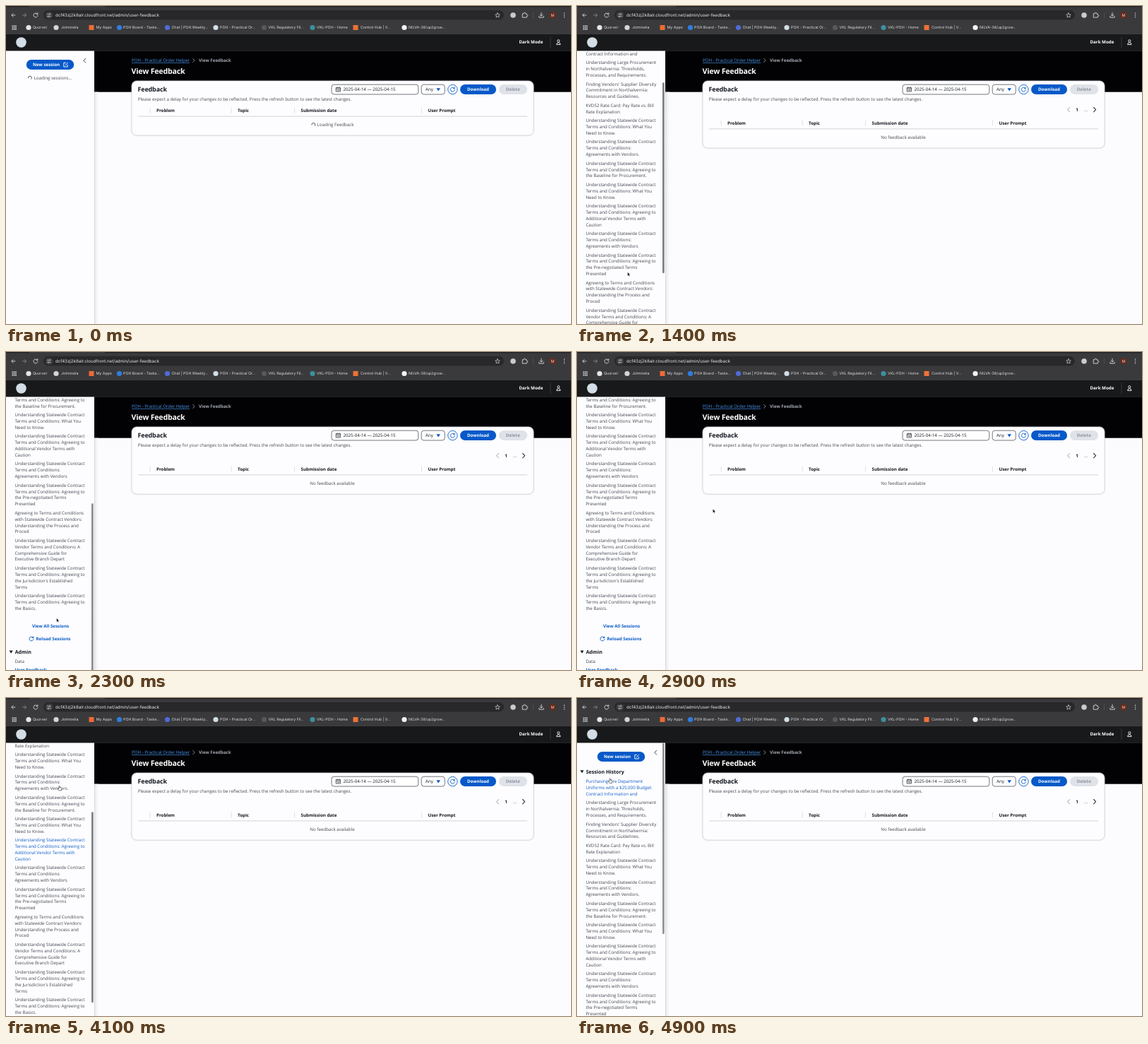
Recreate the animation shown at these times as an HTML page. Size 800x450 px, loop 5000 ms.

```html
<!DOCTYPE html>
<html lang="en">
<head>
<meta charset="utf-8">
<title>View Feedback</title>
<style>
  html, body { margin: 0; width: 100%; height: 100%; overflow: hidden; background: #fcfcff; }
  svg { display: block; width: 800px; height: 450px; }
  text { font: 6.2px "Open Sans", sans-serif; fill: #42464f; text-rendering: geometricPrecision; white-space: pre; }
  .b { font-weight: 700; }
  .dark { fill: #14181f; }
  .white { fill: #fff; }
  .blue { fill: #0b5bc4; }
  .mid { text-anchor: middle; }
  .ui { font: 5.3px Inter, sans-serif; fill: #dcdde0; }
  .url { font: 6.15px Inter, sans-serif; fill: #e8e9eb; }
  .h1 { font-size: 10.65px; letter-spacing: -.02em; }
  .h2 { font-size: 8.85px; letter-spacing: -.008em; }
  .h3 { font-size: 7.1px; }
  .line { fill: none; stroke: #42464f; stroke-width: .9; stroke-linecap: round; stroke-linejoin: round; }
  .item.hover text { fill: #0b5bc4; }
</style>
</head>
<body>
<svg viewBox="0 0 800 450">
  <defs>
    <clipPath id="sideClip"><rect y="63.5" width="125" height="387"/></clipPath>
    <linearGradient id="edge">
      <stop offset="0" stop-color="#c9ccd4"/><stop offset=".25" stop-color="#eceef3"/><stop offset="1" stop-color="#fcfcff"/>
    </linearGradient>
    <filter id="soft" x="-5%" y="-15%" width="110%" height="130%"><feGaussianBlur stdDeviation="1.3"/></filter>
    <g id="reload">
      <path class="line" style="stroke:inherit" d="M2.6 -1.5A3 3 0 1 0 3 .5M2.9 -3.2V-1.3H1"/>
    </g>
  </defs>
  <g id="browser"></g>
  <g id="page"></g>
  <g id="side" clip-path="url(#sideClip)">
    <rect y="63" width="125" height="388" fill="#fdfdff"/>
    <g id="scroll"></g>
    <rect id="thumb" x="121" width="2.7" height="270" rx="1.35" fill="#7d7f83"/>
  </g>
  <g id="cursor">
    <path id="arrow" d="M0 0V5.6L1.3 4.5L2.1 6.5L3.1 6.1L2.3 4.1H4.1Z" fill="#000" stroke="#fff" stroke-width=".55"/>
    <path id="hand" d="M-.7 .4Q0 -.6 .6 .4V2.2L2.6 2.7Q3.4 3 3.3 3.9L2.8 6.4H-.6L-2.4 3.9Q-2.4 3 -1.5 3.4L-.7 4Z" fill="#fff" stroke="#222" stroke-width=".6"/>
  </g>
</svg>
<script>
const LOOP = 5000, STEP = 100;
const $ = id => document.getElementById(id);
const text = (x, y, str, cls = '') => `<text x="${x}" y="${y + 2.2}" class="${cls}">${str}</text>`;
const rect = (x, y, w, h, fill, more = '') => `<rect x="${x}" y="${y}" width="${w}" height="${h}" fill="${fill}" ${more}/>`;
const dot = (x, y, r, fill, more = '') => `<circle cx="${x}" cy="${y}" r="${r}" fill="${fill}" ${more}/>`;
const line = (d, color = '#42464f', w = .9) => `<path class="line" d="${d}" style="stroke:${color};stroke-width:${w}"/>`;
const reload = (x, y, color) => `<use href="#reload" x="${x}" y="${y}" stroke="${color}"/>`;
const spinner = (x, y) => `<circle class="line spin" cx="${x}" cy="${y}" r="2.5" pathLength="1" data-at="${x} ${y}"/>`;

// Browser toolbar and bookmarks
const bookmarks = [
  [32, '#e4e5e7', 'Quorvel'], [71, '#d4d5d8', 'Jotmirelia', 78], [121, '#ee6a35', 'My Apps', 127.5, 1],
  [160.5, '#2e7de0', 'POH Board - Tasks...', 166], [228.5, '#4f6bd8', 'Chat | POH Weekly...', 234.5],
  [297, '#d3dde5', 'POH - Practical Or...', 303], [365.5, '#55585c', 'VKL Regulatory Fil...', 371.5],
  [434, '#3e8fa0', 'VKL-POH - Home', 440], [495, '#ee7237', 'Control Hub | V...', 502, 1],
  [564, '#f2f2f3', 'NILVA-38/up2grow...', 570]
];
const light = '#d6d7da';
let grid = '';
for (let i = 0; i < 9; i++) grid += rect(8.6 + i % 3 * 2.3, 27.5 + (i / 3 | 0) * 2.3, 1.6, 1.6, light);
$('browser').innerHTML =
  rect(0, 0, 800, 39.5, '#3a3a3c') + rect(0, 0, 33, 1.3, '#1f2022') + rect(140, 0, 660, 1.3, '#1f2022') +
  rect(53, 6, 652, 13.5, '#28282a', 'rx="6.75"') +
  line('M13 13H8M10.2 10.7L7.9 13L10.2 15.3', light) +
  line('M23.5 13H28.5M26.3 10.7L28.6 13L26.3 15.3', '#86878a') +
  reload(42, 13, light) + dot(61, 13, 5.3, '#3d3d40') +
  line('M58.7 11.5H60.4M62 14.6H63.4M58.7 14.6H59.6', light, .8) +
  dot(62.2, 11.5, .9, 'none', 'stroke="#d6d7da" stroke-width=".7"') +
  dot(60.3, 14.6, .9, 'none', 'stroke="#d6d7da" stroke-width=".7"') +
  text(70, 13, 'dcf43zj2k8alr.cloudfront.net/admin/user-feedback', 'url') +
  line('M696 9.8L697 12L699.3 12.2L697.5 13.8L698.1 16.1L696 14.8L693.9 16.1L694.5 13.8L692.7 12.2L695 12Z', light, .7) +
  dot(718, 13, 3.8, '#c9cbcd') +
  line('M731.6 10.8H733.3Q733.3 9.2 734.4 9.2T735.5 10.8H737.2V12.5Q738.8 12.5 738.8 13.6T737.2 14.7V16.2H731.6Z', light) +
  rect(746, 9, .6, 8, '#5a5b5e') +
  line('M758 9.3V14M756 12.2L758 14.2L760 12.2M754.8 14.5V16.2H761.2V14.5', light) +
  dot(774, 13, 4.7, '#6b2b1b') + text(774, 12.8, 'M', 'ui mid') +
  [10.3, 13, 15.7].map(y => dot(790.5, y, .75, light)).join('') +
  grid +
  bookmarks.map(([x, fill, name, tx = 38, square]) =>
    (square ? rect(x - 3.5, 27, 7, 7, fill) : dot(x, 30.5, 3.6, fill)) + text(tx, 30.2, name, 'ui')).join('');

// Page content
const blue = '#0759c9';
const columns = [[204, 213, 'Problem'], [319, 328, 'Topic'], [408.5, 417.5, 'Submission date'], [588.5, 597.5, 'User Prompt']];
const card = more => `<rect x="178" y="106" width="569" rx="7" class="card" ${more}/>`;
$('page').innerHTML =
  rect(0, 39.3, 800, 24.5, '#17191b') + dot(21.5, 51.5, 7.3, '#d3dde5') +
  text(726.5, 51, 'Dark Mode', 'b white') + rect(770.6, 43.5, .7, 15.5, '#45484c') +
  dot(782.3, 49.4, 1.6, 'none', 'stroke="#fff" stroke-width=".9"') +
  line('M779.6 54.2Q779.6 51.8 782.3 51.8T785 54.2Z', '#fff') +
  rect(0, 63.5, 800, 58.2, '#020204') + rect(125, 121.7, 6, 330, 'url(#edge)') +
  `<text x="178" y="79.2" style="fill:#4a9bf5;text-decoration:underline">POH - Practical Order Helper</text>` +
  line('M264.6 74.5L267.1 77L264.6 79.5', '#8b919c') +
  `<text x="273" y="79.2" class="b" style="fill:#a3a8b1">View Feedback</text>` +
  text(177.6, 93.6, 'View Feedback', 'h1 b white') +
  card('fill="#8a8f9a" opacity=".45" filter="url(#soft)"') +
  card('fill="#fdfdff" stroke="#cdd0d7" stroke-width=".7"') +
  text(186.5, 119, 'Feedback', 'h2 b dark') +
  text(186.7, 131.8, 'Please expect a delay for your changes to be reflected. Press the refresh button to see the latest changes.') +
  rect(461, 111.2, 122.8, 13.8, '#fff', 'rx="3.4" stroke="#63676f" stroke-width=".9"') +
  line('M467.6 115.6H473.4V121H467.6ZM467.6 117.2H473.4M469 114.7V115.6M472 114.7V115.6M469 119.2H472', '#30343b', .8) +
  text(477.5, 118.2, '2025-04-14 — 2025-04-15', 'dark') +
  rect(588.2, 111.2, 33, 13.8, '#fff', 'rx="3.4" stroke="#63676f" stroke-width=".9"') +
  text(594, 118.2, 'Any', 'dark') + `<path d="M609.4 116.2H615L612.2 120.4Z" fill="${blue}"/>` +
  dot(632.4, 118.1, 6.7, '#fff', `stroke="${blue}" stroke-width=".9"`) + reload(632.4, 118.1, blue) +
  rect(643, 111, 51, 14.1, blue, 'rx="7"') + text(668.5, 118.2, 'Download', 'b white mid') +
  rect(698, 111, 40, 14.1, '#dfe2e8', 'rx="7"') +
  `<text x="717.8" y="120.4" class="b mid" style="fill:#8e949f">Delete</text>` +
  `<g id="head">` + columns.map(([bar, x, name]) =>
    rect(bar - .3, 143.8, .7, 8, '#d2d4da') + text(x, 147.8, name, 'b dark')).join('') +
  rect(187, 155.7, 551, .8, '#c6c9d0') + `</g>` +
  `<g id="loading">${spinner(435.3, 168)}${text(440.5, 168, 'Loading Feedback')}</g>` +
  `<g id="loaded">` + line('M697.6 143.5L694.6 146.7L697.6 149.9', '#8b919c') + text(708, 147, '1', 'b dark mid') +
  text(720.6, 147, '...', 'mid') + line('M731.6 143.5L734.6 146.7L731.6 149.9', '#30343b', 1.1) +
  text(462, 186, 'No feedback available', 'mid') + `</g>`;

// Sidebar
const terms = 'Understanding Statewide Contract|Terms and Conditions: ';
const sessions = [
  'Purchasing Fire Department|Uniforms with a $25,000 Budget:|Contract Information and',
  'Understanding Large Procurement|in Northalvernia: Thresholds,|Processes, and Requirements.',
  'Finding Vendors\' Supplier Diversity|Commitment in Northalvernia:|Resources and Guidelines.',
  'KVD52 Rate Card: Pay Rate vs. Bill|Rate Explanation',
  terms + 'What You|Need to Know.',
  terms + '|Agreements with Vendors.',
  terms + 'Agreeing to|the Baseline for Procurement.',
  terms + 'What You|Need to Know.',
  terms + 'Agreeing to|Additional Vendor Terms with|Caution',
  terms + '|Agreements with Vendors',
  terms + 'Agreeing to|the Pre-negotiated Terms|Presented',
  'Agreeing to Terms and Conditions|with Statewide Contract Vendors:|Understanding the Process and|Proced',
  'Understanding Statewide Contract|Vendor Terms and Conditions: A|Comprehensive Guide for|Executive Branch Depart',
  terms + 'Agreeing to|the Jurisdiction\'s Established|Terms',
  terms + 'Agreeing to|the Basics.'
];
let y = 118;
const list = sessions.map(s => {
  const rows = s.split('|').map((row, i) => text(12.4, y + i * 8.85, row));
  y += rows.length * 8.85 + 3.7;
  return `<g class="item">${rows.join('')}</g>`;
}).join('');
const fold = (y, name) => `<path d="M4.6 ${y - 1.8}H9.6L7.1 ${y + 2.2}Z" fill="#14181f"/>` + text(12.7, y + .4, name, 'h3 b dark');
$('scroll').innerHTML =
  rect(28.8, 76, 67.4, 14.1, blue, 'rx="7"') + text(38, 83.1, 'New session', 'b white') +
  line('M84.5 80.4H81.8V86H87.2V83.4M84.2 83.8L87.6 80.3', '#fff') +
  line('M112.7 74.2L109.8 77.2L112.7 80.2', '#30343b') +
  `<g id="wait">${spinner(33.8, 101.8)}${text(39.5, 101.8, 'Loading sessions...')}</g>` +
  `<g id="history">` + fold(104, 'Session History') + list +
  text(63, 620, 'View All Sessions', 'b blue mid') + reload(36, 637.8, '#0b5bc4') +
  text(42.5, 637.8, 'Reload Sessions', 'b blue') + fold(656.4, 'Admin') +
  text(12.4, 670, 'Data') + text(12.4, 682, 'User Feedback', 'b blue') + `</g>`;

// Keyframes: time followed by values, linear between rows
const scrollKeys = [[1200, 0], [1300, 28], [1600, 148.5], [1900, 219], [2100, 232], [4000, 232], [4100, 150], [4200, 40], [4300, 0]];
const thumbKeys = [[1200, 0], [1300, 1], [2200, 1], [2300, .9], [2500, 0], [4000, 0], [4100, 1], [4700, 1], [4900, .85]];
const cursorKeys = [
  [700, 165, 255], [800, 152, 285], [900, 148, 291], [1200, 71.5, 376.5], [2600, 71.5, 376.5],
  [3000, 232.5, 170.5], [3500, 232.5, 170.5], [3900, 75.5, 124.5], [4300, 75.5, 124.5], [4600, 46.7, 114]
];
function sample(keys, t) {
  const next = keys.findIndex(k => k[0] > t);
  if (next === 0) return keys[0].slice(1);
  if (next < 0) return keys[keys.length - 1].slice(1);
  const a = keys[next - 1], b = keys[next], p = (t - a[0]) / (b[0] - a[0]);
  return a.slice(1).map((v, i) => v + (b[i + 1] - v) * p);
}

const show = (id, on) => $(id).setAttribute('visibility', on ? 'inherit' : 'hidden');
const items = document.querySelectorAll('.item');
const spins = document.querySelectorAll('.spin');
const cards = document.querySelectorAll('.card');

function draw(t) {
  const ready = t >= 1200, listed = t >= 400;
  show('wait', !listed);
  show('history', listed);
  show('loading', !ready);
  show('loaded', ready);
  $('head').setAttribute('transform', `translate(0 ${ready ? 17.8 : 0})`);
  cards.forEach(c => c.setAttribute('height', ready ? 95 : 77));

  const arc = .4 + .2 * Math.cos(t / 900 * Math.PI);
  spins.forEach(s => {
    s.setAttribute('stroke-dasharray', `${arc} 1`);
    s.setAttribute('transform', `rotate(${180 + t * .66} ${s.dataset.at})`);
  });

  const [top] = sample(scrollKeys, t);
  $('scroll').setAttribute('transform', `translate(0 ${-top})`);
  $('thumb').setAttribute('y', 64 + top * .648);
  $('thumb').setAttribute('opacity', sample(thumbKeys, t)[0]);

  const [x, cy] = sample(cursorKeys, t);
  const hand = t > 3500 && x < 114;
  $('cursor').setAttribute('transform', `translate(${x} ${cy})`);
  show('cursor', t >= 700);
  show('arrow', !hand);
  show('hand', hand);
  const hovered = !hand ? -1 : t < 4400 ? 8 : 0;
  items.forEach((el, i) => el.classList.toggle('hover', i === hovered));
}

const start = performance.now();
function tick() {
  const t = (performance.now() - start) % LOOP;
  draw(Math.floor(t / STEP) * STEP);
  requestAnimationFrame(tick);
}
tick();
</script>
</body>
</html>
```
